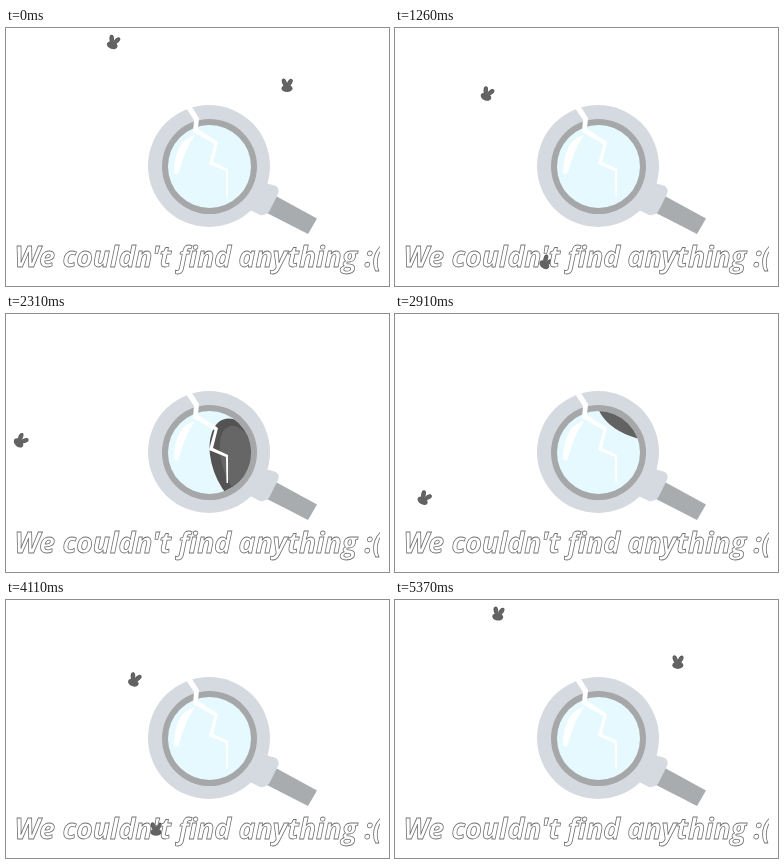
An HTML page that plays this animation: 383x258 px, repeating every 5400 ms.

```html
<!DOCTYPE html>
<html lang="en">
<head>
<meta charset="utf-8">
<title>Nothing found</title>
<style>
  html, body { margin: 0; width: 100%; height: 100%; overflow: hidden; background: #fff; }
  svg { display: block; width: 383px; height: 258px; }
  text { font: italic 700 28.4px "Open Sans", "Noto Sans", sans-serif; fill: #fff; stroke: #707070; stroke-width: .8; }
</style>
</head>
<body>
<svg viewBox="0 0 383 258">
  <defs>
    <g id="wing">
      <ellipse rx="1.9" ry="3.3" fill="#535353"/>
      <ellipse cx=".2" cy=".3" rx="1.4" ry="3" fill="#666"/>
    </g>
    <g id="fly">
      <use href="#wing" transform="translate(-2.2 -3) rotate(-20)"/>
      <use href="#wing" transform="translate(2.4 -3) rotate(28)"/>
      <ellipse cy="2" rx="4.600" ry="3.100" fill="#626262"/>
    </g>
    <clipPath id="glass"><circle cx="203.500" cy="138.500" r="41.500"/></clipPath>
    <clipPath id="caption"><rect width="374" height="258"/></clipPath>
  </defs>

  <g id="flies"></g>

  <path d="M268 167 311 190.500 302 206 259 184Z" fill="#a8acae"/>
  <path d="M253 153 270 158Q274 161 272 166L263 184Q259 188 254 187L240 180Z" fill="#d5d9e0"/>
  <circle cx="203" cy="138" r="61" fill="#d5d9e0"/>
  <circle cx="203.500" cy="138.500" r="47.500" fill="#a6a7a9"/>
  <circle cx="203.500" cy="138.500" r="41.500" fill="#e6f9ff"/>
  <g id="magnified" clip-path="url(#glass)"></g>
  <path d="M189 107Q169 112 168 144Q170 149 173 144Q179 121 189 107Z" fill="#fff"/>
  <path d="M178 77 186 79 193 90 192 101 212 114 207 134 222 141 222 169 220.500 169 220 143 203 136 208.500 116 187 104 188 92Z" fill="#fff"/>

  <text x="8.500" y="239" clip-path="url(#caption)">We couldn't find anything :(</text>
</svg>

<script>
const LOOP = 5400, STEP = 30;
const LENS = { x: 204, y: 138, spread: 4, zoom: 14 };

// Waypoints evenly spaced in time around each closed path
const paths = [
  "107,15 137,78 130,176 158,240 203,194 218,154 220,141 214,88 179,60 134,78 90,91 33,50",
  "281,58 220,49 152,52 79,71 34,97 15,122 19,168 45,200 85,218 139,234 234,178 280,172"
].map(path => path.split(" ").map(point => point.split(",").map(Number)));

function addFly(parent) {
  const node = document.createElementNS("http://www.w3.org/2000/svg", "use");
  node.setAttribute("href", "#fly");
  document.getElementById(parent).append(node);
  return node;
}

const flies = paths.map(path => ({ path, near: addFly("flies"), large: addFly("magnified") }));

// Closed Catmull-Rom spline
function pointAt(path, progress) {
  const n = path.length, s = progress * n, i = Math.floor(s), u = s - i;
  const [a, b, c, d] = [-1, 0, 1, 2].map(k => path[(i + k + n) % n]);
  return [0, 1].map(k => b[k] + u / 2 * (c[k] - a[k]
    + u * (2 * a[k] - 5 * b[k] + 4 * c[k] - d[k]
    + u * (3 * (b[k] - c[k]) + d[k] - a[k]))));
}

function place(node, x, y, tilt, scale) {
  node.setAttribute("transform", `translate(${x} ${y}) rotate(${tilt}) scale(${scale})`);
}

function draw(now) {
  const t = Math.floor(now % LOOP / STEP) * STEP;
  for (const { path, near, large } of flies) {
    const [x, y] = pointAt(path, t / LOOP);
    const drop = pointAt(path, (t + STEP) % LOOP / LOOP)[1] - y;
    const tilt = Math.min(45, Math.max(0, drop) * 15); // lean while descending
    place(near, x, y, tilt, 1.2);
    place(large, LENS.x + LENS.spread * (x - LENS.x), LENS.y + LENS.spread * (y - LENS.y), tilt, LENS.zoom);
  }
}

const start = performance.now();
function frame() {
  draw(performance.now() - start);
  requestAnimationFrame(frame);
}
frame();
</script>
</body>
</html>
```
